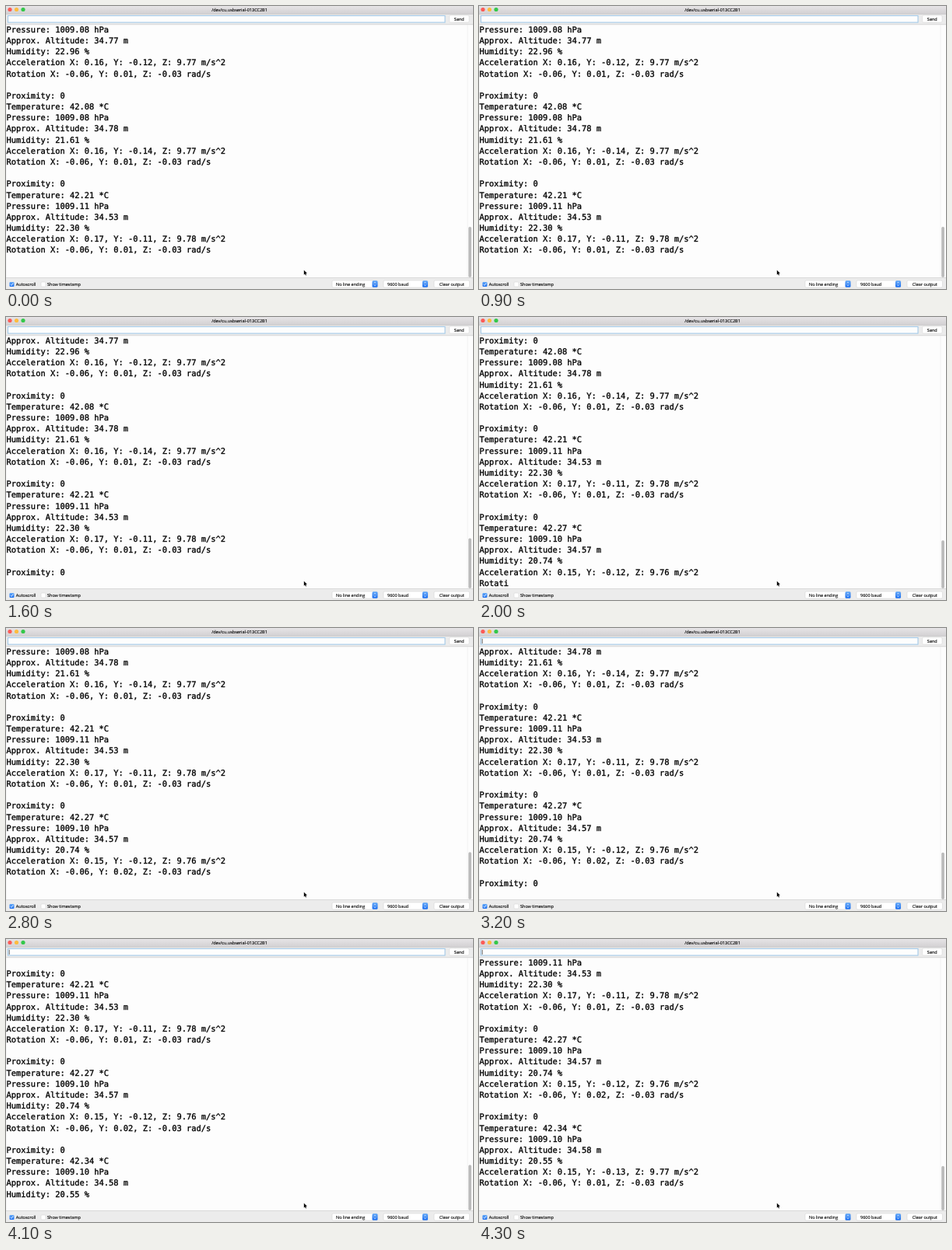
An HTML page that plays this animation: 600x364 px, repeating every 4.4 s.

```html
<!DOCTYPE html>
<html lang="en">
<head>
<meta charset="utf-8">
<title>Serial monitor</title>
<style>
  html, body { margin: 0; width: 100%; height: 100%; overflow: hidden; background: #fdfdfd; }
  svg { display: block; width: 600px; height: 364px; text-rendering: geometricPrecision; }
  .ui { font: 5.5px "Open Sans", Inter, sans-serif; fill: #000; stroke: #000; stroke-width: .12; }
  #log { font: 10.4px "DejaVu Sans Mono", monospace; fill: #000; stroke: #000; stroke-width: .32; }
  .button { fill: #fff; stroke: #cfcfcf; stroke-width: .5; }
</style>
</head>
<body>
<svg viewBox="0 0 600 364">
  <defs>
    <linearGradient id="bar" x2="0" y2="1">
      <stop stop-color="#e6e4e6"/><stop offset="1" stop-color="#d2d0d2"/>
    </linearGradient>
    <linearGradient id="blue" x2="0" y2="1">
      <stop stop-color="#62a8f8"/><stop offset="1" stop-color="#1a6df0"/>
    </linearGradient>
    <g id="stepper">
      <rect width="7" height="8.6" rx="1.5" fill="url(#blue)"/>
      <path d="M2.2 3.5 3.5 2 4.8 3.5M2.2 5.1 3.5 6.6 4.8 5.1" fill="none" stroke="#fff" stroke-width=".7"/>
    </g>
  </defs>

  <rect width="600" height="364" fill="#ececec"/>
  <rect width="600" height="10.5" fill="url(#bar)"/>
  <path d="M0 10.5H600" stroke="#bcbabc" stroke-width=".5"/>
  <circle cx="5" cy="4.5" r="2.6" fill="#fc5b57"/>
  <circle cx="13.5" cy="4.5" r="2.6" fill="#fdbc40"/>
  <circle cx="22" cy="4.5" r="2.6" fill="#34c84a"/>

  <rect x="2.5" y="12.5" width="561.5" height="8.6" fill="#fdfdfd" stroke="#a3c9e8" stroke-width="1.1"/>
  <path id="caret" d="M4.2 13.8V20" stroke="#222" stroke-width=".7"/>
  <rect class="button" x="569.5" y="12" width="25.5" height="9" rx="1.6"/>

  <rect y="24" width="600" height="325.5" fill="#fdfdfd"/>
  <path d="M0 23.8H600M0 349.6H600" stroke="#c4c4c4" stroke-width=".6"/>
  <path d="M.2 24V349.5M593 24V349.5" stroke="#e4e4e4" stroke-width=".5"/>
  <g id="log"></g>
  <rect id="thumb" x="594.2" width="3.7" rx="1.8" fill="#bababa"/>

  <rect x="4.5" y="355" width="6" height="6" rx="1.2" fill="url(#blue)"/>
  <path d="M5.9 358.1 7.1 359.5 9.2 356.3" fill="none" stroke="#fff" stroke-width=".8"/>
  <rect class="button" x="45" y="355" width="6" height="6" rx="1.2"/>
  <rect class="button" x="419" y="353" width="58.5" height="9" rx="1.6"/>
  <rect class="button" x="485" y="353" width="57" height="9" rx="1.6"/>
  <rect class="button" x="550" y="353" width="45.5" height="9" rx="1.6"/>
  <use href="#stepper" x="470.5" y="353.2"/>
  <use href="#stepper" x="535" y="353.2"/>

  <g class="ui">
    <text x="300" y="6.9" text-anchor="middle">/dev/cu.usbserial-013CC2B1</text>
    <text x="582.3" y="18.5" text-anchor="middle">Send</text>
    <text x="12.8" y="359.9">Autoscroll</text>
    <text x="53" y="359.9">Show timestamp</text>
    <text x="424" y="359.6">No line ending</text>
    <text x="490" y="359.6">9600 baud</text>
    <text x="572.8" y="359.6" text-anchor="middle">Clear output</text>
  </g>
  <path d="M382.8 339.8V345.7L384.1 344.5 385 346.5 386 346.1 385.1 344.1H386.9Z"
        fill="#000" stroke="#fff" stroke-width=".5" paint-order="stroke"/>
</svg>
<script>
const LOOP = 4400, PERIOD = 2200, TICK = 100, ROWS = 23;
const LINE = 14.18, TOP = 24, VIEW = 325;
const $ = id => document.getElementById(id);

const record = (temp, pressure, alt, hum, x, y, z, ry = "0.01") =>
  `Proximity: 0
Temperature: ${temp} *C
Pressure: ${pressure} hPa
Approx. Altitude: ${alt} m
Humidity: ${hum} %
Acceleration X: ${x}, Y: ${y}, Z: ${z} m/s^2
Rotation X: -0.06, Y: ${ry}, Z: -0.03 rad/s

`;
const records = [
  record("42.02", "1009.08", "34.77", "22.96", "0.16", "-0.12", "9.77"),
  record("42.08", "1009.08", "34.78", "21.61", "0.16", "-0.14", "9.77"),
  record("42.21", "1009.11", "34.53", "22.30", "0.17", "-0.11", "9.78"),
  record("42.27", "1009.10", "34.57", "20.74", "0.15", "-0.12", "9.76", "0.02"),
  record("42.34", "1009.10", "34.58", "20.55", "0.15", "-0.13", "9.77"),
];

const rows = Array.from({ length: ROWS }, (_, i) => {
  const row = document.createElementNS("http://www.w3.org/2000/svg", "text");
  row.setAttribute("x", .6);
  row.setAttribute("y", 33.8 + i * LINE);
  return $("log").appendChild(row);
});

// The proximity line arrives first; the rest follows in one burst.
const received = ms =>
  ms < 1000 ? 0 : 13 + Math.max(0, Math.floor((ms - 1730) * .52));

function draw(t) {
  const full = 3 + Math.floor(t / PERIOD);
  const text = records.slice(0, full).join("") +
    records[full].slice(0, received(t % PERIOD));
  const lines = text.split("\n");
  lines.slice(-ROWS).forEach((line, i) => {
    if (rows[i].textContent !== line) rows[i].textContent = line;
  });

  const height = VIEW * ROWS / (90 + lines.length);
  $("thumb").setAttribute("y", TOP + VIEW - height);
  $("thumb").setAttribute("height", height);

  const blink = t % 1000;
  $("caret").style.opacity = blink >= 100 && blink < 600 ? 1 : 0;
}

const start = performance.now();
function frame() {
  const t = (performance.now() - start) % LOOP;
  draw(Math.floor(t / TICK) * TICK);
  requestAnimationFrame(frame);
}
frame();
</script>
</body>
</html>
```
